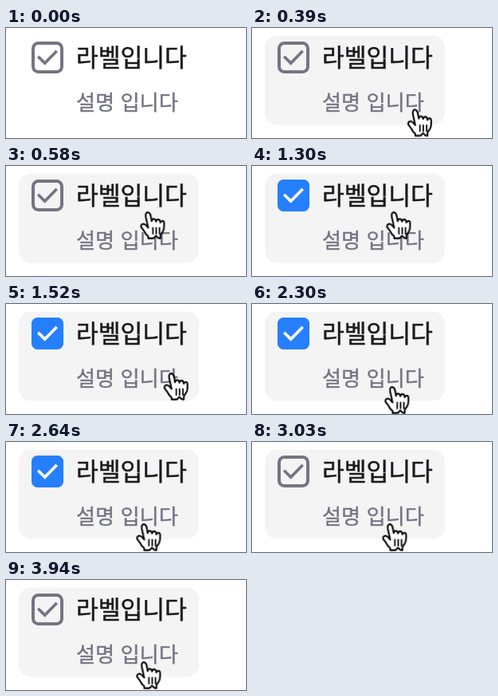
These frames come from a looping animation (301x138 px, 4.36 s). An HTML page:

```html
<!DOCTYPE html>
<html lang="ko">
<head>
<meta charset="utf-8">
<title>체크박스</title>
<style>
  html, body { margin: 0; width: 100%; height: 100%; overflow: hidden; background: #fff; }
  svg { display: block; width: 100%; height: 100%; }
  text { font-family: "Noto Sans CJK KR", "Noto Sans CJK", "Noto Sans CJK JP", sans-serif; }
  .label { font-size: 30.2px; fill: #1b1b1e; stroke: #1b1b1e; stroke-width: .5; }
  .note { font-size: 26.2px; fill: #757483; stroke: #757483; stroke-width: .4; }
  .tick { fill: none; stroke-width: 3.6; }
  .hover, .checked, .cursor { animation: 4360ms linear infinite; }
  .hover { animation-name: hover; }
  .checked { animation-name: check; }
  .cursor { animation-name: move; }

  @keyframes hover {
    0%, 4.5% { opacity: 0; }
    8.5%, 35.5% { opacity: 1; }
    37%, 49.5% { opacity: 0; }
    52.5%, 100% { opacity: 1; }
  }
  @keyframes check {
    0%, 25% { opacity: 0; animation-timing-function: ease; }
    29.6%, 60.55% { opacity: 1; animation-timing-function: ease; }
    68.8%, 100% { opacity: 0; }
  }
  @keyframes move {
    0%, 4.1% { transform: translate(206px, 140px); }
    4.82%, 8.26% { transform: translate(202px, 114px); animation-timing-function: ease-out; }
    13.3%, 32.57% { transform: translate(168px, 57px); animation-timing-function: ease-in; }
    36.93% { transform: translate(252px, 140px); }
    48.6% { transform: translate(236px, 140px); animation-timing-function: ease-out; }
    52.75% { transform: translate(166px, 103px); animation-timing-function: ease-out; }
    56.19%, 100% { transform: translate(163px, 102px); }
  }
</style>
</head>
<body>
<svg viewBox="0 0 301 138">
  <defs><path id="tick" d="M40.2 35.7L48.7 44.1L63.7 28.7"/></defs>
  <rect class="hover" x="16" y="9.5" width="226" height="112" rx="15" fill="#f4f4f5"/>

  <rect x="34" y="19" width="36" height="36" rx="6.5" fill="none" stroke="#757483" stroke-width="4"/>
  <use href="#tick" class="tick" stroke="#757483"/>
  <g class="checked">
    <rect x="32" y="17" width="40" height="40" rx="7.5" fill="#267fff"/>
    <use href="#tick" class="tick" stroke="#fff"/>
  </g>

  <text class="label" x="88" y="48">라벨입니다</text>
  <text class="note" x="88" y="103.3">설명 입니다</text>

  <g class="cursor">
    <g transform="translate(-16.4 -14.6) scale(2.1)" stroke="#000" stroke-width="1" stroke-linejoin="round" stroke-linecap="round">
      <path fill="#fff" d="M11.3 20.4L10.1 18.4L8.6 16.5Q8.2 14.5 9.8 14.4Q10.8 14.4 12.7 16.7L11.3 10.2Q10.9 7.6 12.5 7.5Q13.8 7.6 14.2 9.5L14.8 12.8Q15 11.4 16 11.4Q17.3 11.5 17.4 13Q17.7 11.7 18.7 11.7Q19.9 11.8 20 13.6Q20.5 12.5 21.3 12.6Q22.2 12.7 22.2 14V16Q22.2 18 21.2 19.4Q20 20.7 20 21.6V23Q18.6 23.3 17.7 21.8Q17.3 21.4 17 21.8Q16.4 23 15.6 23H12.7Q12.9 21.8 12.3 21.4Z"/>
      <path fill="none" stroke-width=".85" d="M19.5 16.7V20.3M17.5 16.7V20.3M15.5 16.7V20.3"/>
    </g>
  </g>
</svg>
</body>
</html>
```
